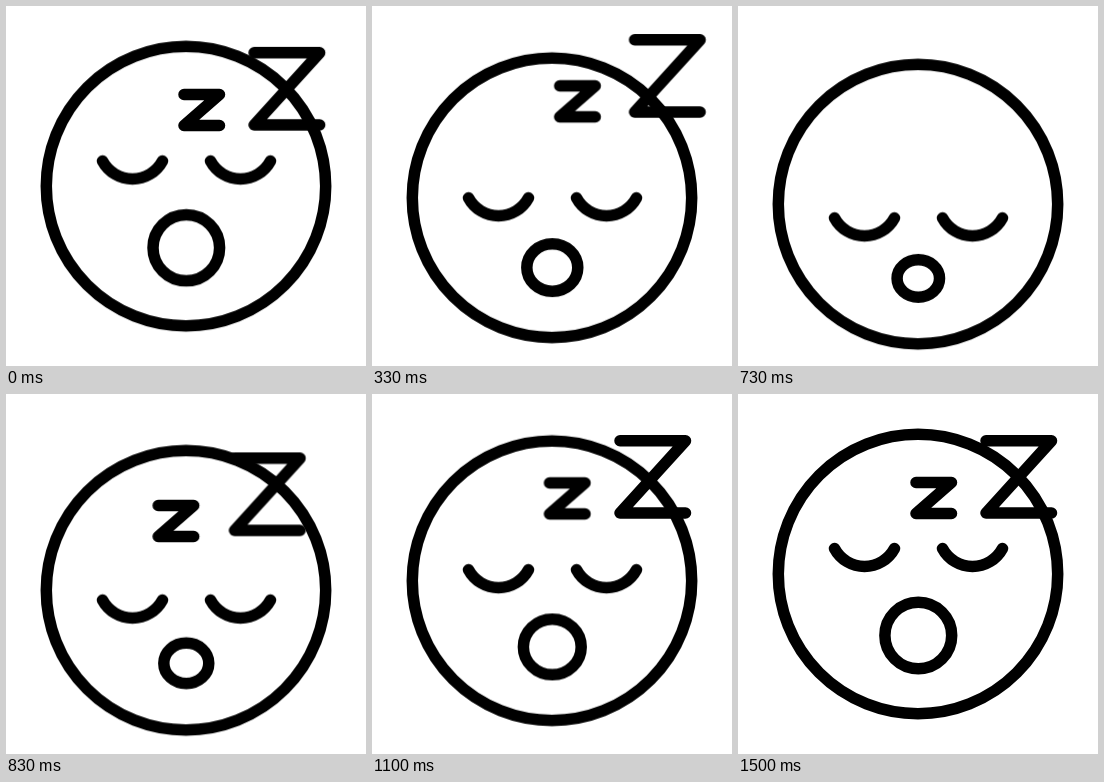
Recreate the animation shown at these times as an HTML page without scripts. Size 360 by 360 pixels, loop 1670 ms.

```html
<!DOCTYPE html>
<html lang="en">
<head>
<meta charset="utf-8">
<title>Sleeping face</title>
<style>
  html, body { margin: 0; width: 100%; height: 100%; overflow: hidden; background: #fff; }
  svg { display: block; width: 100%; height: 100%; }

  .ink { fill: none; stroke: #000; stroke-width: 11.5; stroke-linecap: round; stroke-linejoin: round; }

  .nod, .snore { animation: nod 1670ms -33ms infinite; }
  .snore { animation-name: nod, breathe; }
  .head { --dy: 18.5px; }
  .eyes { --dy: 58.5px; }
  .snore { --dy: 31.5px; }

  .zed { animation: drift 1670ms -33ms infinite; }
  .late { animation-delay: -1636ms; }

  /* sink, rest briefly, rise with a longer tail */
  @keyframes nod {
    0% { transform: none; animation-timing-function: cubic-bezier(.333, 0, .6, 1); }
    38.6%, 41.9% { transform: translateY(var(--dy)); animation-timing-function: cubic-bezier(.333, 0, .5, 1); }
    91.8%, 100% { transform: none; }
  }
  @keyframes breathe {
    0% { rx: 33.4px; ry: 33.2px; animation-timing-function: cubic-bezier(.333, 0, .6, 1); }
    38.6%, 41.9% { rx: 21px; ry: 18.4px; animation-timing-function: cubic-bezier(.333, 0, .5, 1); }
    91.8%, 100% { rx: 33.4px; ry: 33.2px; }
  }

  /* accelerate away, vanish, slide back in from below */
  @keyframes drift {
    0% { transform: none; opacity: 1; animation-timing-function: cubic-bezier(.333, 0, .667, .333); }
    31.73% { transform: translate(31px, -27.5px); opacity: 1; animation-timing-function: step-end; }
    31.74%, 46.28% { transform: translate(-28px, 25px); opacity: 0; animation-timing-function: step-end; }
    46.29% { transform: translate(-28px, 25px); opacity: 1; animation-timing-function: linear; }
    64.2%, 100% { transform: none; opacity: 1; }
  }
</style>
</head>
<body>
<svg viewBox="0 0 360 360">
  <g class="ink">
    <circle class="nod head" cx="180" cy="180" r="139.7"/>
    <path class="nod eyes" d="M96.5 154.5a34 34 0 0 0 60 0M204.5 154.5a34 34 0 0 0 60 0"/>
    <ellipse class="snore" cx="180.3" cy="241.5" rx="33.4" ry="33.2"/>
    <path class="zed late" d="M178 88.5H213.5L178 119.5H213.5"/>
    <path class="zed" d="M248 46.8H313.5L248 119H313.5"/>
  </g>
</svg>
</body>
</html>
```
